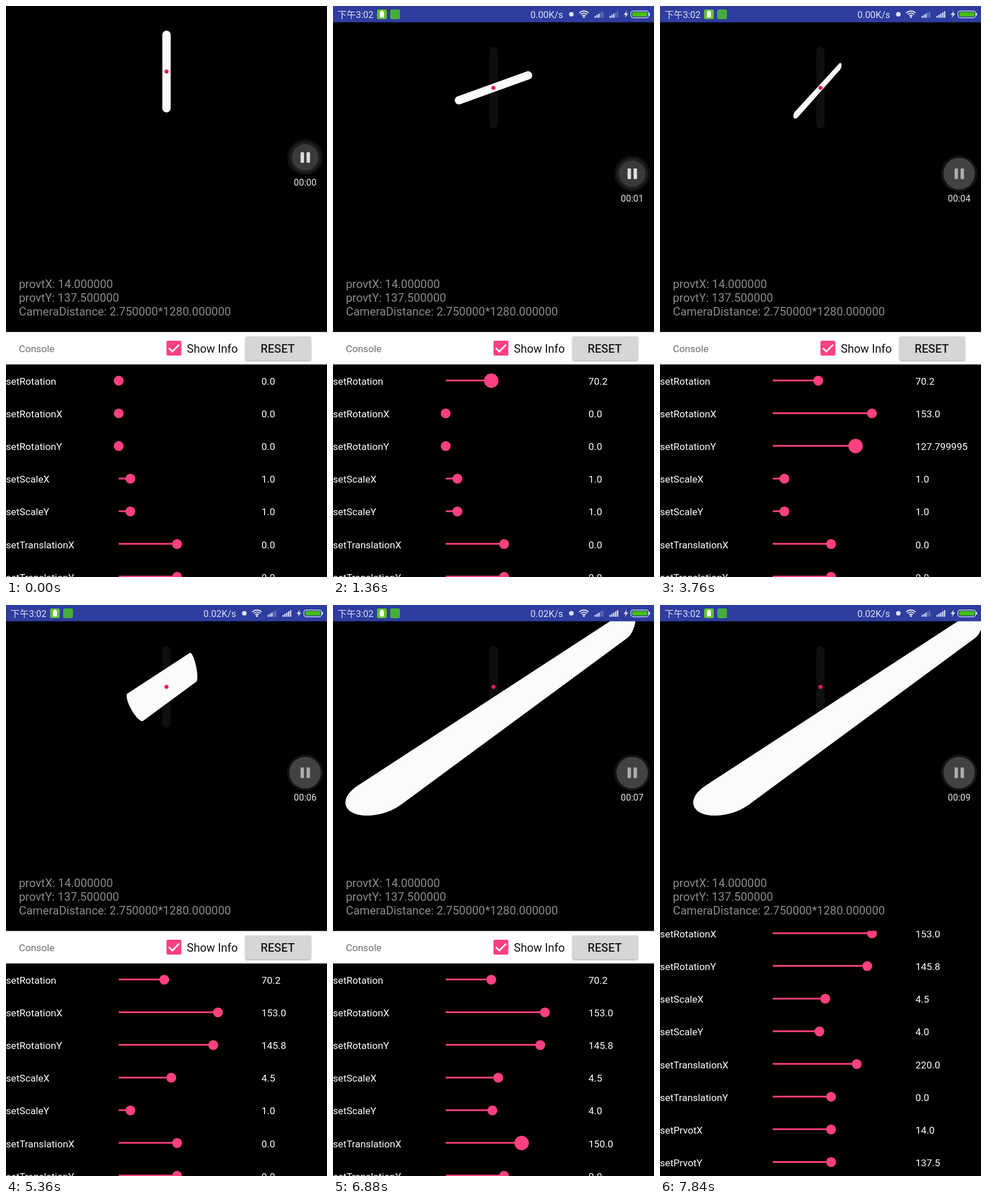
These frames come from a looping animation (561x998 px, 8 s). An HTML page with a canvas:

```html
<!DOCTYPE html>
<html lang="zh">
<head>
<meta charset="utf-8">
<title>View property console</title>
<style>
  html, body { margin: 0; width: 100%; height: 100%; overflow: hidden; background: #000; }
  canvas { display: block; width: 561px; height: 998px; }
</style>
</head>
<body>
<canvas id="stage" width="561" height="998"></canvas>
<script>
const W = 561, H = 998, LOOP = 8000, STEP = 80;
const S = W / 1080;            // stage pixels per device pixel
const CAMERA = 576;            // camera distance in device pixels
const PINK = '#ff4081';
const FONT = 'Roboto, "Noto Sans CJK SC", "Noto Sans CJK", sans-serif';
const PANEL_TOP = 569.5, ROW_TOP = 654.6, ROW_GAP = 57.1;
const ctx = document.getElementById('stage').getContext('2d');

// keys: [time, slider percent]; up: time the finger lifts
const rows = [
  { name: 'setRotation', min: 0, max: 180, keys: [[560, 0], [1040, 22], [1360, 39]], up: 1440 },
  { name: 'setRotationX', min: 0, max: 180, keys: [[1760, 0], [2240, 48], [2640, 85]], up: 2640 },
  { name: 'setRotationY', min: 0, max: 180, keys: [[3040, 0], [3760, 71], [3920, 81]], up: 3920 },
  { name: 'setScaleX', min: 0, max: 10, keys: [[4320, 10], [4720, 31], [5120, 45]], up: 5200 },
  { name: 'setScaleY', min: 0, max: 10, keys: [[5520, 10], [5840, 25], [6160, 40]], up: 6160 },
  { name: 'setTranslationX', min: -500, max: 500, keys: [[6480, 50], [6880, 65], [7120, 72]], up: 7120 },
  { name: 'setTranslationY', min: -500, max: 500, keys: [[0, 50]] },
  { name: 'setPrvotX', min: 0, max: 28, keys: [[0, 50]] },
  { name: 'setPrvotY', min: 0, max: 275, keys: [[0, 50]] }
];

const ramp = (t, a, b) => Math.min(1, Math.max(0, (t - a) / (b - a)));
const mix = (a, b, k) => a + (b - a) * k;
const gray = v => `rgb(${Math.round(v)},${Math.round(v)},${Math.round(v)})`;

function percent(row, t) {
  const keys = row.keys;
  let p = keys[0][1];
  for (let i = 1; i < keys.length; i++) {
    p = mix(p, keys[i][1], ramp(t, keys[i - 1][0], keys[i][0]));
  }
  return Math.round(p);
}

function valueOf(row, p) {
  const f = Math.fround;
  return f(row.min + f((row.max - row.min) * f(p / 100)));
}

// Shortest decimal that reads back as the same 32-bit float
function floatText(v) {
  let n = v;
  for (let d = 1; d < 10; d++) {
    n = Number(v.toPrecision(d));
    if (Math.fround(n) === v) break;
  }
  return Number.isInteger(n) ? n.toFixed(1) : String(n);
}

function text(str, x, y, size, color, weight = 400) {
  ctx.font = `${weight} ${size}px ${FONT}`;
  ctx.fillStyle = color;
  ctx.fillText(str, x, y);
}

function disc(x, y, r, color) {
  ctx.fillStyle = color;
  ctx.beginPath();
  ctx.arc(x, y, r, 0, Math.PI * 2);
  ctx.fill();
}

function box(x, y, w, h, r, color) {
  ctx.fillStyle = color;
  ctx.beginPath();
  ctx.roundRect(x, y, w, h, r);
  ctx.fill();
}

function stroke(points, color, width) {
  ctx.strokeStyle = color;
  ctx.lineWidth = width;
  ctx.beginPath();
  points.forEach(p => ctx.lineTo(p[0], p[1]));
  ctx.stroke();
}

// Rounded bar, scaled, then turned about Z, Y and X and seen in perspective
function drawBar(cx, cy, v) {
  const [rz, rx, ry] = v.slice(0, 3).map(a => a * Math.PI / 180);
  const [sx, sy, tx] = v.slice(3, 6);
  const n = 32;
  ctx.beginPath();
  for (let i = 0; i < 2 * n + 2; i++) {
    const upper = i <= n;
    const a = Math.PI * (upper ? i : i - 1) / n;
    const x = 14 * Math.cos(a) * sx;
    const y = ((upper ? 123.5 : -123.5) + 14 * Math.sin(a)) * sy;
    const x1 = x * Math.cos(rz) + y * Math.sin(rz);
    const y1 = y * Math.cos(rz) - x * Math.sin(rz);
    const x2 = x1 * Math.cos(ry), z2 = x1 * Math.sin(ry);
    const y3 = y1 * Math.cos(rx) - z2 * Math.sin(rx);
    const z3 = y1 * Math.sin(rx) + z2 * Math.cos(rx);
    const k = CAMERA / (CAMERA + z3);
    ctx.lineTo(cx + (x2 * k + tx) * S, cy - y3 * k * S);
  }
  ctx.closePath();
  ctx.fillStyle = '#fbfbf9';
  ctx.fill();
}

function drawScene(t, values, shift) {
  const cx = 280.5, cy = 143 - shift;
  ctx.save();
  ctx.beginPath();
  ctx.rect(0, 0, W, PANEL_TOP);
  ctx.clip();
  box(cx - 7.3, cy - 71.4, 14.6, 142.8, 7.3, '#0f0f0f');
  drawBar(cx, cy, values);
  disc(cx, cy, 3.6, '#e01e5c');
  ['provtX: 14.000000', 'provtY: 137.500000', 'CameraDistance: 2.750000*1280.000000']
    .forEach((line, i) => text(line, 22.5, 493 + i * 24, 20.2, '#8a8a8a'));
  ctx.restore();
}

function drawRecorder(t, shift) {
  const x = 522.8, y = 293 - shift, k = ramp(t, 1360, 1520);
  disc(x, y, 31.5, gray(mix(15, 20, k)));
  disc(x, y, 27.5, gray(mix(30, 66, k)));
  disc(x, y, 23, gray(mix(58, 66, k)));
  const bar = gray(mix(222, 172, k));
  box(x - 8, y - 9, 6, 18.5, 1, bar);
  box(x + 2.5, y - 9, 6, 18.5, 1, bar);
  const sec = Math.max(0, Math.floor((t - 150) / 853.4));
  ctx.textAlign = 'center';
  text('00:0' + sec, x, y + 49, 15.9, '#e6e6e6');
  ctx.textAlign = 'left';
}

function drawSignal(x, lit) {
  for (let i = 0; i < 5; i++) {
    const h = 3 + i * 2.1;
    box(x + i * 3.3, 20.5 - h, 2.3, h, 0, i < lit ? '#dde1f4' : '#6672ba');
  }
}

function drawStatus(t) {
  const y = -28.5 * (1 - ramp(t, 160, 480));
  if (y <= -28.5) return;
  const ink = '#dde1f4';
  ctx.save();
  ctx.translate(0, y);
  box(0, 0, W, 28.5, 0, '#2e3d9f');
  text('下午3:02', 8, 20.5, 16, ink);
  box(77, 6, 17, 17, 3, '#62c232');
  box(82, 9.5, 7, 10.5, 1, '#fff');
  box(84, 8.2, 3, 2, 0, '#fff');
  box(100, 6, 17, 17, 3, '#45ad3b');
  text(t < 4800 ? '0.00K/s' : '0.02K/s', 345, 20.5, 16.3, ink);
  disc(416.5, 14.5, 4, ink);

  ctx.strokeStyle = ink;
  ctx.lineWidth = 1.9;
  for (const r of [4, 7.6, 11.2]) {
    ctx.beginPath();
    ctx.arc(438.5, 20, r, -Math.PI * 0.76, -Math.PI * 0.24);
    ctx.stroke();
  }
  disc(438.5, 19.2, 1.7, ink);

  drawSignal(457, 3);
  drawSignal(483, t < 3360 ? 3 : 5);
  ctx.fillStyle = ink;
  ctx.beginPath();
  [[513.5, 8], [508, 15.5], [511.5, 15.5], [510, 21], [516, 13], [512.3, 13]]
    .forEach(p => ctx.lineTo(p[0], p[1]));
  ctx.fill();
  ctx.strokeStyle = ink;
  ctx.lineWidth = 1.2;
  ctx.beginPath();
  ctx.roundRect(520.6, 8.6, 31, 12, 4);
  ctx.stroke();
  box(552, 12, 2, 5, 1, ink);
  box(523, 10.6, 26.5, 8, 2, '#45bd17');
  ctx.restore();
}

function drawHeader() {
  box(0, PANEL_TOP, W, 57, 0, '#fff');
  text('Console', 22.5, 604.5, 17.14, '#6c6c6c');
  box(280.5, 585, 26, 26, 2.5, PINK);
  stroke([[284.7, 598], [290.7, 604], [302.5, 592]], '#fff', 2.8);
  text('Show Info', 316, 605.5, 20, '#111');
  ctx.save();
  ctx.shadowColor = 'rgba(0,0,0,.35)';
  ctx.shadowBlur = 3;
  ctx.shadowOffsetY = 1.5;
  box(418.5, 577.5, 114.5, 41.5, 2, '#d6d6d6');
  ctx.restore();
  text('RESET', 445, 605.8, 20, '#1c1c1c', 500);
}

function drawRow(row, i, p, t) {
  const y = ROW_TOP + i * ROW_GAP, x = 197 + 2.04 * p;
  text(row.name, 0, y + 7.4, 17.14, '#fff');
  stroke([[197, y], [x, y]], PINK, 3);
  const start = row.keys[0][0];
  const press = row.up ? ramp(t, start, start + 160) - ramp(t, row.up, row.up + 160) : 0;
  disc(x, y + 0.3, mix(8.6, 12.6, press), PINK);
  text(floatText(valueOf(row, p)), 446.5, y + 7.4, 17.14, '#fff');
}

function drawPanel(t, percents) {
  const scroll = 138 * (1 - (1 - ramp(t, 7360, 7840)) ** 2);
  ctx.save();
  ctx.beginPath();
  ctx.rect(0, PANEL_TOP, W, H - PANEL_TOP);
  ctx.clip();
  ctx.translate(0, -scroll);
  drawHeader();
  rows.forEach((row, i) => drawRow(row, i, percents[i], t));
  ctx.restore();
}

function draw(t) {
  const percents = rows.map(row => percent(row, t));
  const values = rows.map((row, i) => valueOf(row, percents[i]));
  const shift = t < 320 ? 28.5 : 0;
  ctx.fillStyle = '#000';
  ctx.fillRect(0, 0, W, H);
  drawScene(t, values, shift);
  drawPanel(t, percents);
  drawStatus(t);
  drawRecorder(t, shift);
}

const begin = performance.now();
function tick() {
  const t = (performance.now() - begin) % LOOP;
  draw(Math.floor(t / STEP) * STEP);
  requestAnimationFrame(tick);
}
tick();
</script>
</body>
</html>
```
